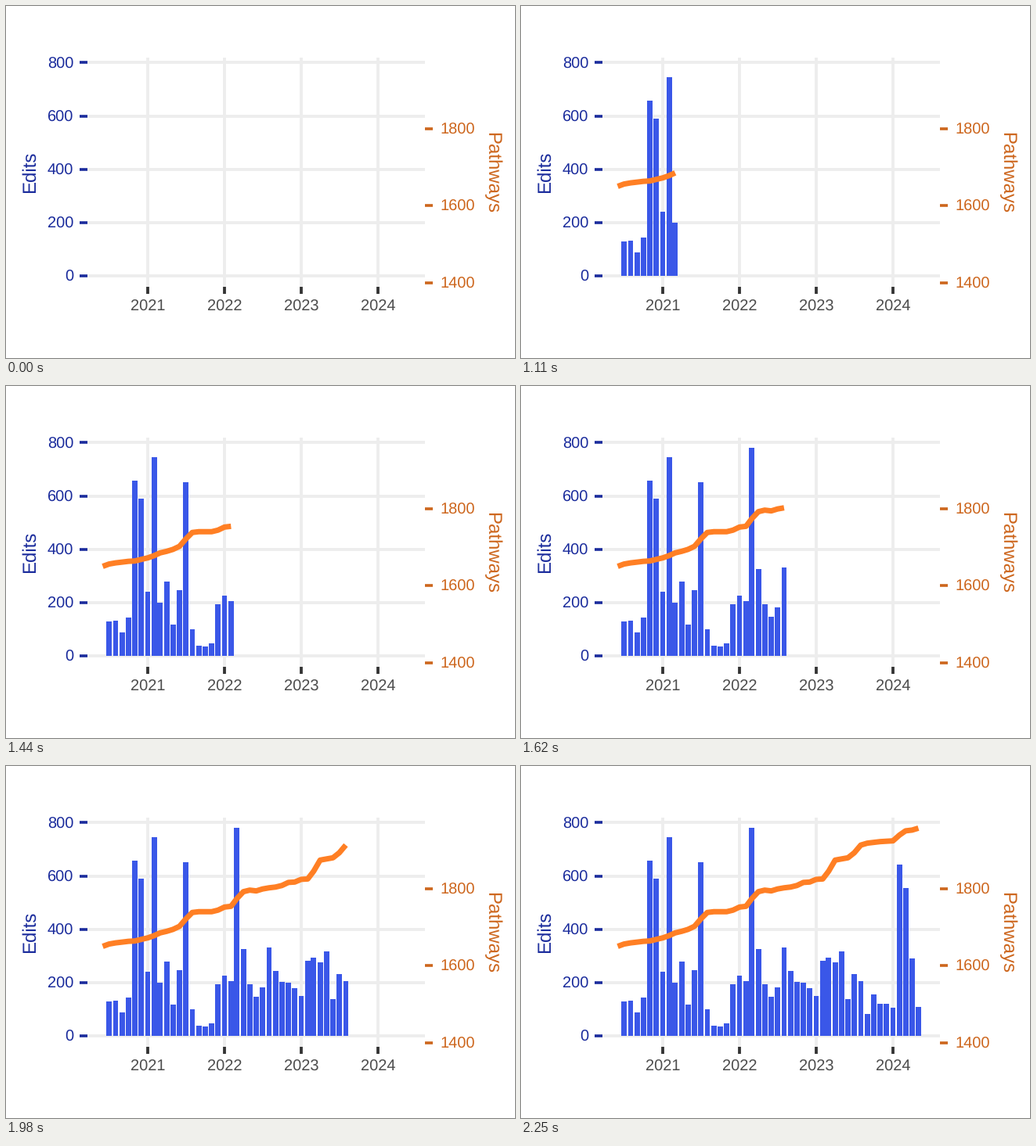
Recreate the animation shown at these times as a matplotlib script. Size 650 by 450 pixels, loop 2.28 s.

```python
import matplotlib.pyplot as plt
from matplotlib.animation import FuncAnimation
from matplotlib.patches import Rectangle
import numpy as np

W, H, DPI = 650, 450, 100
PT = 72 / DPI
STEP, HOLD, MONTHS = 30, 29, 47

BAR, LINE = "#3A57E8", "#FF7F24"
BLUE, RUST = "#1A2B9C", "#CD661D"
GRID, TICK, GREY = "#EDEDED", "#333333", "#4D4D4D"

plt.rcParams["font.family"] = "Liberation Sans"
plt.rcParams["text.hinting"] = "none"

edits = [130, 132, 88, 143, 658, 590,
         240, 745, 200, 278, 118, 248, 650, 100, 40, 35, 47, 193,
         225, 206, 780, 325, 195, 148, 182, 333, 243, 203, 199, 178,
         150, 281, 293, 276, 317, 138, 232, 205, 84, 155, 121, 120,
         106, 642, 555, 290, 108]
pathways = [1650, 1656, 1659, 1661, 1663, 1664, 1668,
            1672, 1678, 1685, 1689, 1694, 1702, 1721, 1738, 1740, 1740, 1740, 1744,
            1752, 1754, 1774, 1792, 1796, 1794, 1799, 1802, 1804, 1808, 1816, 1817,
            1824, 1825, 1845, 1874, 1877, 1880, 1893, 1913, 1918, 1920, 1922, 1923,
            1924, 1939, 1950, 1952, 1957]

# Month starts from June 2020, as pixel positions
months = np.datetime64("2020-06") + np.arange(MONTHS + 1)
days = (months.astype("datetime64[D]") - np.datetime64("2021-01-01")).astype(float)
xs = 181 + days * 98 / 365


def edit_y(v):
    return 345.2 - v * 0.3411


def path_y(v):
    return 353.6 - (np.asarray(v) - 1400) * 0.4922


fig = plt.figure(figsize=(W / DPI, H / DPI), dpi=DPI, facecolor="white")
ax = fig.add_axes([0, 0, 1, 1])
ax.set(xlim=(0, W), ylim=(H, 0))
ax.axis("off")


def stroke(x, y, color, width, z):
    return ax.plot(x, y, color=color, lw=width * PT, zorder=z,
                   solid_capstyle="butt", solid_joinstyle="round")[0]


def label(x, y, s, color, size=20, ha="center", angle=0):
    ax.text(x, y, s, color=color, fontsize=size * PT, ha=ha, va="baseline",
            rotation=angle, rotation_mode="anchor")


for v in range(0, 801, 200):
    y = edit_y(v)
    stroke([104, 535], [y, y], GRID, 3.8, 1)
    stroke([94, 104], [y, y], BLUE, 3.6, 2)
    label(86, y + 7, str(v), BLUE, ha="right")

for i in range(4):
    x = 181 + 98 * i
    stroke([x, x], [66, 359], GRID, 3.8, 1)
    stroke([x, x], [359, 368], TICK, 3.8, 2)
    label(x, 390, str(2021 + i), GREY)

for v in (1400, 1600, 1800):
    y = path_y(v)
    stroke([535, 545], [y, y], RUST, 3.6, 2)
    label(554, y + 7, str(v), RUST, ha="left")

label(37, 212, "Edits", BLUE, 24, angle=90)
label(614, 213, "Pathways", RUST, 24, angle=-90)

bar_w = 6.8
bars = [ax.add_patch(Rectangle((x - bar_w / 2, edit_y(v)), bar_w, 345.2 - edit_y(v),
                               fc=BAR, lw=0, zorder=3))
        for x, v in zip(xs[1:], edits)]
trend = stroke([], [], LINE, 7, 4)
ys = path_y(pathways)


def draw(i):
    n = max(0, i - HOLD + 1)
    for k, bar in enumerate(bars):
        bar.set_visible(k < n)
    end = n + 1 if n else 0
    trend.set_data(xs[:end], ys[:end])
    return [*bars, trend]


anim = FuncAnimation(fig, draw, frames=HOLD + MONTHS, interval=STEP,
                     repeat=True, repeat_delay=0)
plt.show()
```
